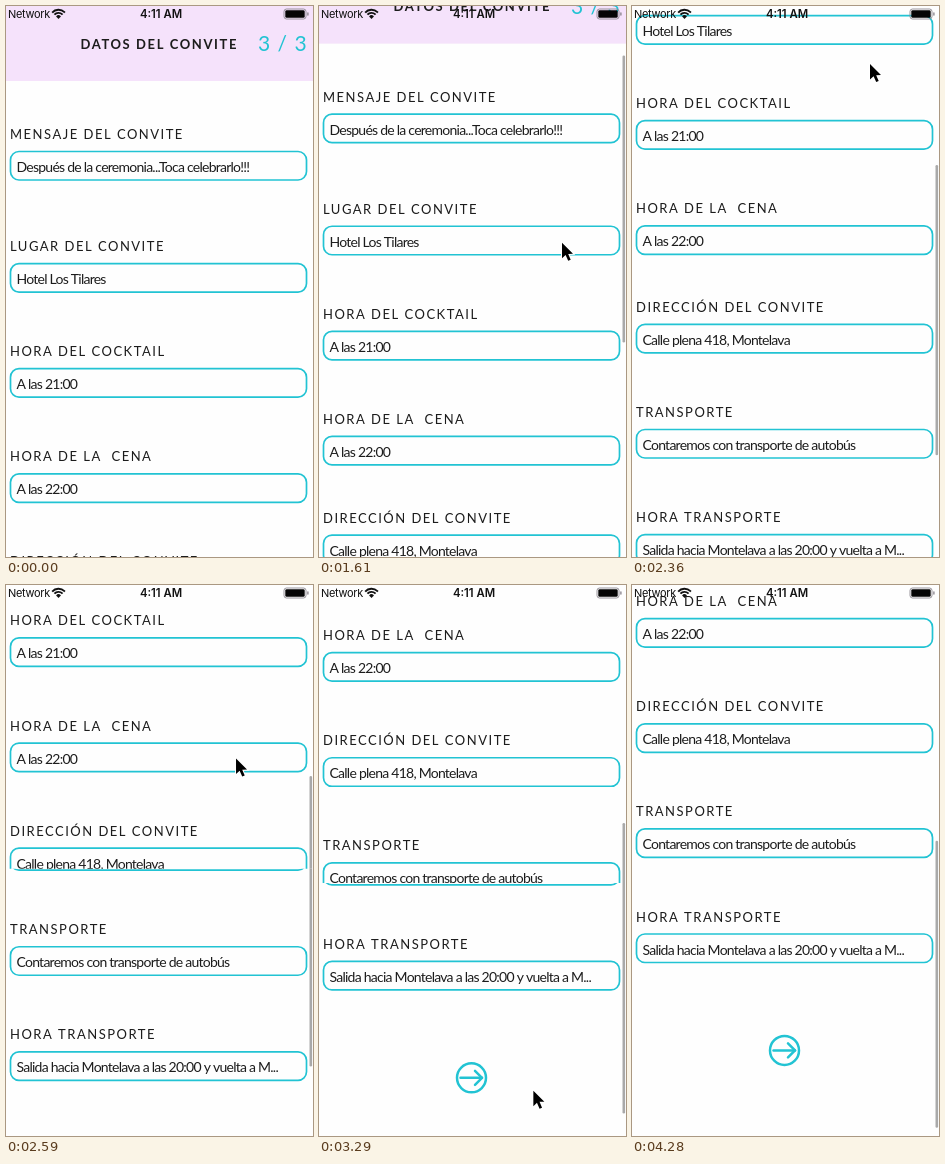
Animation, 307 px wide and 551 px high, one loop 4360 ms. Source, as an HTML page with a canvas:

```html
<!DOCTYPE html>
<html lang="es">
<head>
<meta charset="utf-8">
<title>Datos del convite</title>
<style>
html, body { margin: 0; width: 100%; height: 100%; overflow: hidden; background: #fefefe; }
canvas { display: block; width: 307px; height: 551px; }
</style>
</head>
<body>
<canvas id="stage"></canvas>
<script>
const W = 307, H = 551, LOOP = 4360;
const CYAN = '#22c3d3', INK = '#1c1c1c', LILAC = '#f5e2fb', PAPER = '#fefefe';

const FIELDS = [
  ['MENSAJE DEL CONVITE', 'Después de la ceremonia...Toca celebrarlo!!!'],
  ['LUGAR DEL CONVITE', 'Hotel Los Tilares'],
  ['HORA DEL COCKTAIL', 'A las 21:00'],
  ['HORA DE LA  CENA', 'A las 22:00'],
  ['DIRECCIÓN DEL CONVITE', 'Calle plena 418, Montelava'],
  ['TRANSPORTE', 'Contaremos con transporte de autobús'],
  ['HORA TRANSPORTE', 'Salida hacia Montelava a las 20:00 y vuelta a M...']
];

// Runs of screen refreshes: first time, last time, count
const REFRESHES = [
  [70, 590, 8], [670, 670, 1], [900, 1130, 4], [1300, 1760, 7], [1830, 2280, 7],
  [2360, 2820, 7], [2900, 3360, 7], [3440, 3900, 7], [3980, 4280, 5]
];

// Pointer tip: time, x, y
const POINTER = [
  [70, 255, 533], [300, 241, 400], [520, 226, 321], [590, 228, 314], [670, 233, 310],
  [900, 235, 314], [1130, 242, 329], [1300, 243, 290], [1760, 243, 211], [1910, 243, 167],
  [2280, 240, 62], [2360, 238, 58], [2480, 235, 90], [2900, 216, 409], [3360, 214, 526]
];

// Height of the tear line while the list scrolls
const TEAR = [[1300, 500], [1910, 500], [2360, 273], [2900, 298], [3360, 298]];

const canvas = document.getElementById('stage');
const ctx = canvas.getContext('2d');
const dpr = window.devicePixelRatio || 1;
canvas.width = Math.round(W * dpr);
canvas.height = Math.round(H * dpr);

function snap(t) {
  let shown = 0;
  for (const [first, last, count] of REFRESHES) {
    for (let i = 0; i < count; i++) {
      const at = Math.round((first + (last - first) * i / Math.max(1, count - 1)) / 10) * 10;
      if (at <= t) shown = at;
    }
  }
  return shown;
}

function track(keys, t) {
  const i = keys.findIndex(key => key[0] >= t);
  if (i < 0) return keys[keys.length - 1].slice(1);
  if (i === 0) return keys[0].slice(1);
  const a = keys[i - 1], b = keys[i];
  const k = (t - a[0]) / (b[0] - a[0]);
  return a.slice(1).map((v, n) => v + (b[n + 1] - v) * k);
}

// Drag picks up speed, runs evenly, then coasts to rest
function scrollAt(t) {
  if (t < 1250) return 0;
  if (t < 1760) return 75 * ((t - 1250) / 510) ** 2;
  if (t < 2360) return 75.5 + (t - 1760) * 0.2875;
  return 248 + 194 * (1 - Math.exp((2360 - t) / 600));
}

function text(str, x, y, font, color = INK, spacing = 0, align = 'left') {
  ctx.font = font;
  ctx.letterSpacing = spacing + 'px';
  ctx.fillStyle = color;
  ctx.textAlign = align;
  ctx.fillText(str, x, y);
}

function roundRect(x, y, w, h, r) {
  ctx.beginPath();
  ctx.roundRect(x, y, w, h, r);
}

function line(points) {
  ctx.beginPath();
  points.forEach(([x, y]) => ctx.lineTo(x, y));
}

function drawField([label, value], index) {
  const top = index ? 257.6 + (index - 1) * 105.1 : 145.5;
  text(label, 4, top - 12.5, '13px Lato, sans-serif', INK, 1.5);
  ctx.strokeStyle = CYAN;
  ctx.lineWidth = 1.7;
  roundRect(4.5, top, 296, 28.5, 8.5);
  ctx.stroke();
  text(value, 10.5, top + 20.5, '14px Lato, sans-serif', INK, -0.75);
}

function drawNextButton(x, y) {
  ctx.strokeStyle = CYAN;
  ctx.lineWidth = 2.5;
  ctx.lineCap = ctx.lineJoin = 'round';
  ctx.beginPath();
  ctx.arc(x, y, 14.5, 0, Math.PI * 2);
  ctx.stroke();
  line([[x - 11, y], [x + 10.5, y]]);
  ctx.stroke();
  line([[x + 3.5, y - 7], [x + 10.5, y], [x + 3.5, y + 7]]);
  ctx.stroke();
}

function drawPage(scroll, from, to) {
  ctx.save();
  ctx.beginPath();
  ctx.rect(0, from, W, to - from);
  ctx.clip();
  ctx.save();
  ctx.translate(0, -scroll);
  ctx.fillStyle = LILAC;
  ctx.fillRect(0, 0, W, 75);
  text('DATOS DEL CONVITE', 74.5, 42.5, 'bold 13px Lato, sans-serif', INK, 1.6);
  text('3 / 3', 252, 45, '21px Lato, sans-serif', CYAN, 1);
  FIELDS.forEach(drawField);
  drawNextButton(152.5, 899.5);
  ctx.restore();
  if (scroll > 0) {
    ctx.fillStyle = '#a9a9a9';
    roundRect(303.5, 30 + scroll * 0.52, 2.6, 287, 1.3);
    ctx.fill();
  }
  ctx.restore();
}

function drawStatus() {
  text('Network', 2, 12, '11px Inter, sans-serif', '#111', -0.3);
  text('4:11 AM', 155, 12, '600 11.3px Inter, sans-serif', '#111', 0, 'center');

  ctx.strokeStyle = ctx.fillStyle = '#111';
  ctx.lineCap = 'butt';
  ctx.lineWidth = 1.9;
  for (const r of [5.6, 8.7]) {
    ctx.beginPath();
    ctx.arc(52.5, 12.5, r, -Math.PI * 0.76, -Math.PI * 0.24);
    ctx.stroke();
  }
  ctx.beginPath();
  ctx.moveTo(52.5, 13);
  ctx.arc(52.5, 12.5, 3.2, -Math.PI * 0.77, -Math.PI * 0.23);
  ctx.fill();

  ctx.strokeStyle = '#8d8890';
  ctx.lineWidth = 0.9;
  roundRect(278, 3, 22, 10, 2.5);
  ctx.stroke();
  ctx.fillStyle = '#050505';
  roundRect(279.3, 4.3, 19.4, 7.4, 1.3);
  ctx.fill();
  ctx.fillStyle = '#8d8890';
  roundRect(301.2, 6.2, 1.4, 3.6, 0.7);
  ctx.fill();
}

function drawPointer(x, y) {
  const shape = [[0, 0], [0, 15.5], [3.6, 12.2], [6.2, 18], [8.7, 17], [6.2, 11.2], [11, 11]];
  ctx.save();
  ctx.translate(x, y);
  line(shape);
  ctx.closePath();
  ctx.lineJoin = 'miter';
  ctx.lineWidth = 2;
  ctx.strokeStyle = '#fff';
  ctx.stroke();
  ctx.fillStyle = '#000';
  ctx.fill();
  ctx.restore();
}

function draw(t) {
  ctx.setTransform(dpr, 0, 0, dpr, 0, 0);
  ctx.fillStyle = PAPER;
  ctx.fillRect(0, 0, W, H);

  const scroll = scrollAt(t);
  if (t >= 1300 && t <= 3360) {
    const [tear] = track(TEAR, t);
    drawPage(scroll, 0, tear);
    drawPage(scroll + Math.min(scroll, 6.5), tear, H);
  } else {
    drawPage(scroll, 0, H);
  }
  drawStatus();
  if (t >= 70 && t <= 3360) drawPointer(...track(POINTER, t));
}

const start = performance.now();
function tick() {
  draw(snap((performance.now() - start) % LOOP));
  requestAnimationFrame(tick);
}
tick();
</script>
</body>
</html>
```
